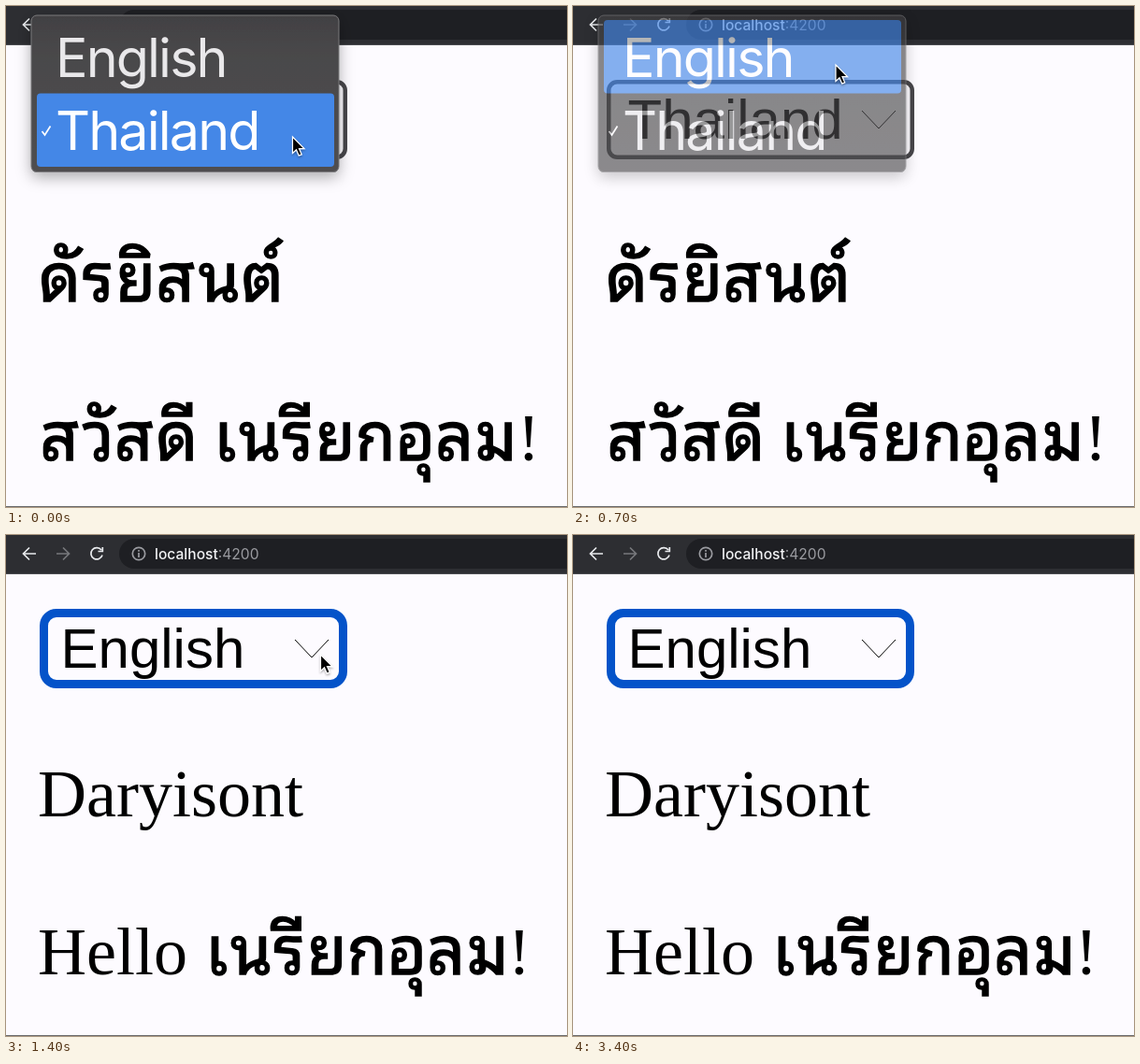
Recreate the animation shown at these times as an HTML page. Size 600 by 536 pixels, loop 3500 ms.

```html
<!DOCTYPE html>
<html lang="th">
<head>
<meta charset="utf-8">
<title>Language switch</title>
<style>
html, body { margin: 0; width: 100%; height: 100%; overflow: hidden; background: #fdfbff; }
svg { display: block; }
.thai { font: 500 72px 'Noto Sans Thai Looped', 'Noto Looped Thai', Loma, 'Noto Serif Thai', 'Noto Sans Thai', sans-serif; stroke: #000; stroke-width: 1.5; }
.serif { font: 72px 'Liberation Serif', serif; }
.field { font: 60px 'Liberation Sans', sans-serif; }
.item { font: 57.5px Inter, sans-serif; letter-spacing: -1.9px; fill: #e9e8ea; }
.item.on { fill: #fff; }
.url { font: 15.6px Inter, sans-serif; fill: #9a9ba0; }
.host { font-weight: 500; fill: #f1f2f4; }
.line { fill: none; stroke-width: 1.7; }
</style>
</head>
<body>
<svg width="600" height="536" viewBox="0 0 600 536">
  <defs>
    <linearGradient id="glass" x2="0" y2="1">
      <stop offset="0" stop-color="#424143"/>
      <stop offset=".3" stop-color="#4a494b"/>
      <stop offset="1" stop-color="#4f4e50"/>
    </linearGradient>
    <filter id="shadow" x="-20%" y="-20%" width="140%" height="150%">
      <feDropShadow dx="0" dy="5" stdDeviation="8" flood-opacity=".33"/>
    </filter>
    <filter id="soft" x="-50%" y="-50%" width="200%" height="200%">
      <feDropShadow dx="0" dy="1.5" stdDeviation="1.2" flood-opacity=".35"/>
    </filter>
  </defs>

  <rect width="600" height="536" fill="#fdfbff"/>
  <rect width="600" height="41" fill="#2d2e32"/>
  <path d="M0 41.5H600" stroke="#4a4b4f"/>
  <rect x="121" y="4" width="500" height="32" rx="16" fill="#1e1f23"/>
  <path class="line" stroke="#e8eaed" d="M32 20H19M25 13.5L18.5 20L25 26.5"/>
  <path class="line" stroke="#77787c" d="M54 20H67M61 13.5L67.5 20L61 26.5"/>
  <path class="line" stroke="#e8eaed" d="M102 16A6.2 6.2 0 1 0 103 21.5M103.3 13V17.5H98.5"/>
  <circle class="line" cx="142" cy="20" r="6.7" stroke="#9a9ba0"/>
  <path class="line" stroke="#9a9ba0" d="M142 19V24M142 16V17.7"/>
  <text class="url" x="159" y="25.5"><tspan class="host">localhost</tspan>:4200</text>
  <path d="M0 535.5H600" stroke="#6b6b6e"/>

  <rect id="frame" fill="none"/>
  <text id="value" class="field" x="58.5" y="141.5"></text>
  <path d="M309 112L327 131L345 112" fill="none" stroke="#000"/>

  <g id="thaiPage">
    <text class="thai" x="34" y="316">ดัรยิสนต์</text>
    <text class="thai" x="36" y="486">สวัสดี</text>
    <text class="thai" x="223" y="486">เนรียกอุลม</text>
    <text class="serif" x="547" y="486">!</text>
  </g>
  <g id="englishPage">
    <text class="serif" x="34" y="301">Daryisont</text>
    <text class="serif" x="34" y="470">Hello</text>
    <text class="thai" x="214" y="470">เนรียกอุลม</text>
    <text class="serif" x="537" y="470">!</text>
  </g>

  <g id="menu">
    <rect x="27" y="10" width="329" height="168" rx="6" fill="url(#glass)" filter="url(#shadow)"/>
    <rect x="27" y="10" width="329" height="167.5" rx="6" fill="none" stroke="#7b7a7d"/>
    <rect id="glow" x="33" width="318" height="78.5" rx="4" fill="#4487e7"/>
    <path class="line" stroke="#fff" d="M38.5 134L41.5 138L47.5 128.5"/>
    <text class="item" x="53" y="76">English</text>
    <text class="item" x="53" y="154">Thailand</text>
  </g>
  <path id="cursor" d="M0 0V17.5L4 13.8L6.7 20L9.7 18.8L7 12.7H12.5Z" fill="#000" stroke="#fff" stroke-width="1.2" filter="url(#soft)"/>
</svg>
<script>
const LOOP = 3500, STEP = 100;
const $ = id => document.getElementById(id);
const items = document.querySelectorAll('.item');
const set = (el, attrs) => { for (const k in attrs) el.setAttribute(k, attrs[k]); };
const show = (el, on) => { el.style.display = on ? '' : 'none'; };

// Pointer moves: start, end, from, to
const moves = [
  [0, 500, [306.5, 140], [281, 63]],
  [800, 1200, [281, 63], [337, 126]],
  [1300, 1400, [337, 126], [336.5, 128]],
  [1400, 1900, [336.5, 128], [541, 282]],
  [2300, 2400, [541, 282], [583, 293]]
];
const ease = p => p * p * (3 - 2 * p);

function pointer(t) {
  const [a, b, from, to] = moves.filter(m => m[0] <= t).pop();
  const p = ease(Math.min(1, (t - a) / (b - a)));
  return from.map((v, i) => v + (to[i] - v) * p);
}

function draw(t) {
  const english = t >= 900;
  const [x, y] = pointer(t);
  const w = english ? 9 : 4.5;

  set($('frame'), {
    x: 36 + w / 2, y: 79 + w / 2, width: 329 - w, height: 85 - w,
    rx: english ? 13.5 : 9, stroke: english ? '#0453c9' : '#47464a', 'stroke-width': w
  });
  $('value').textContent = english ? 'English' : 'Thailand';
  show($('thaiPage'), !english);
  show($('englishPage'), english);

  // The chosen row blinks off once before the menu fades
  const row = t === 500 ? -1 : y < 94 ? 0 : 1;
  show($('menu'), t < 900);
  $('menu').style.opacity = t < 700 ? 1 : t < 800 ? 0.65 : 0.04;
  show($('glow'), row >= 0);
  $('glow').setAttribute('y', row ? 93.5 : 15);
  items.forEach((el, i) => el.classList.toggle('on', i === row));

  show($('cursor'), t < 2500);
  $('cursor').setAttribute('transform', `translate(${x} ${y})`);
}

function tick() {
  const t = performance.now() % LOOP;
  draw(Math.floor(t / STEP) * STEP);
  requestAnimationFrame(tick);
}
tick();
</script>
</body>
</html>
```
